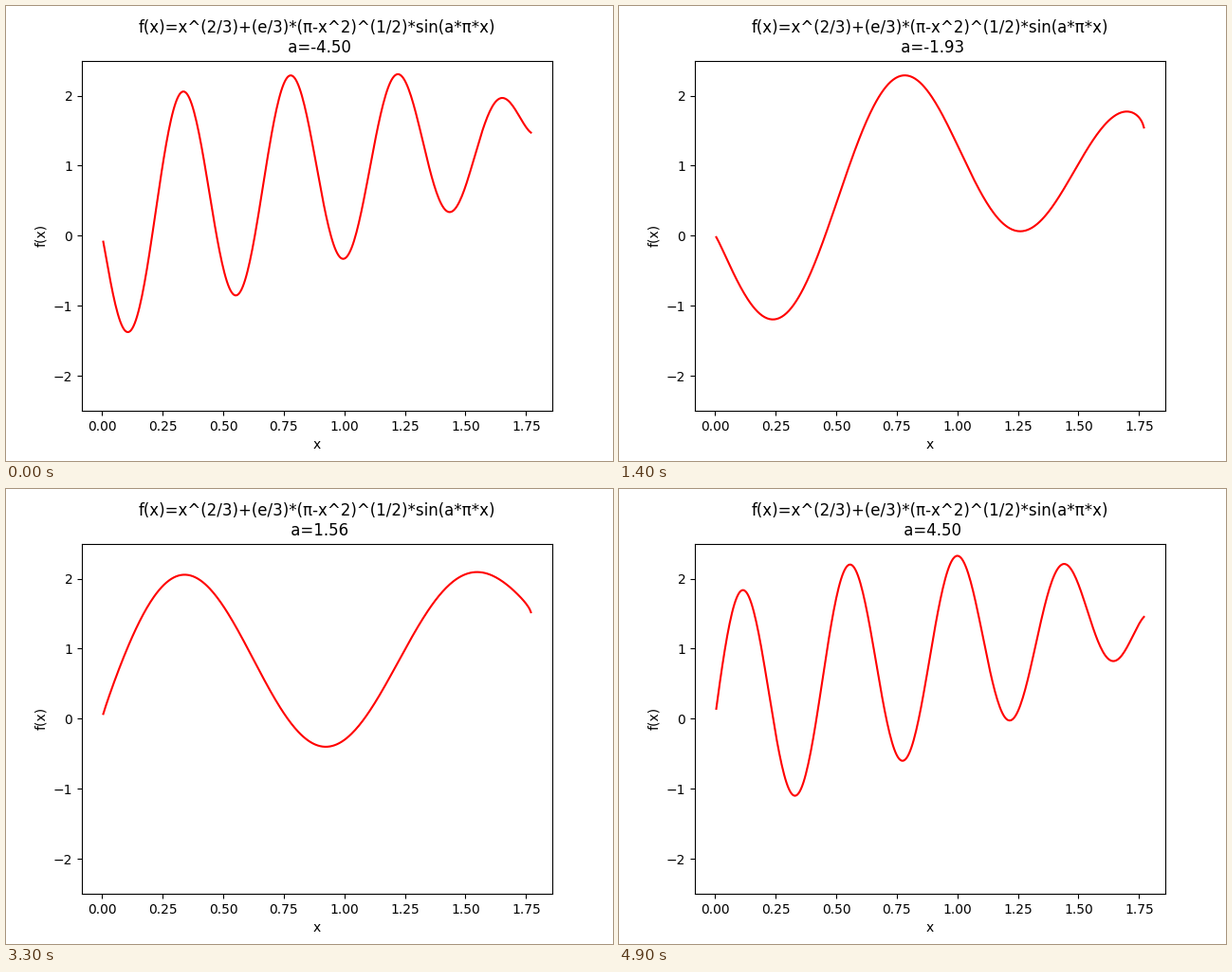
Animation, 640 px wide and 480 px high, one loop 5 s. Source, as a matplotlib script:

```python
import numpy as np
import matplotlib.pyplot as plt
from matplotlib.animation import FuncAnimation

FRAMES = 50
INTERVAL = 100
FORMULA = "f(x)=x^(2/3)+(e/3)*(π-x^2)^(1/2)*sin(a*π*x)"

plt.rcParams["font.family"] = "DejaVu Sans"

x = np.linspace(0.005, 1.77, 354)
base = x ** (2 / 3)
envelope = np.e / 3 * np.sqrt(np.pi - x ** 2)
a_values = np.linspace(-4.5, 4.5, FRAMES)


def curve(a):
    return base + envelope * np.sin(a * np.pi * x)


fig, ax = plt.subplots(figsize=(6.4, 4.8), dpi=100)
line, = ax.plot(x, curve(a_values[0]), color="red", lw=1.5)
ax.set_ylim(-2.5, 2.5)
ax.set_xlabel("x")
ax.set_ylabel("f(x)")
title = ax.set_title("")


def update(frame):
    a = a_values[frame]
    line.set_ydata(curve(a))
    title.set_text(f"{FORMULA}\n a={a:.2f}")
    return line, title


anim = FuncAnimation(fig, update, frames=FRAMES, interval=INTERVAL,
                     repeat=True, repeat_delay=0, blit=False)
plt.show()
```
